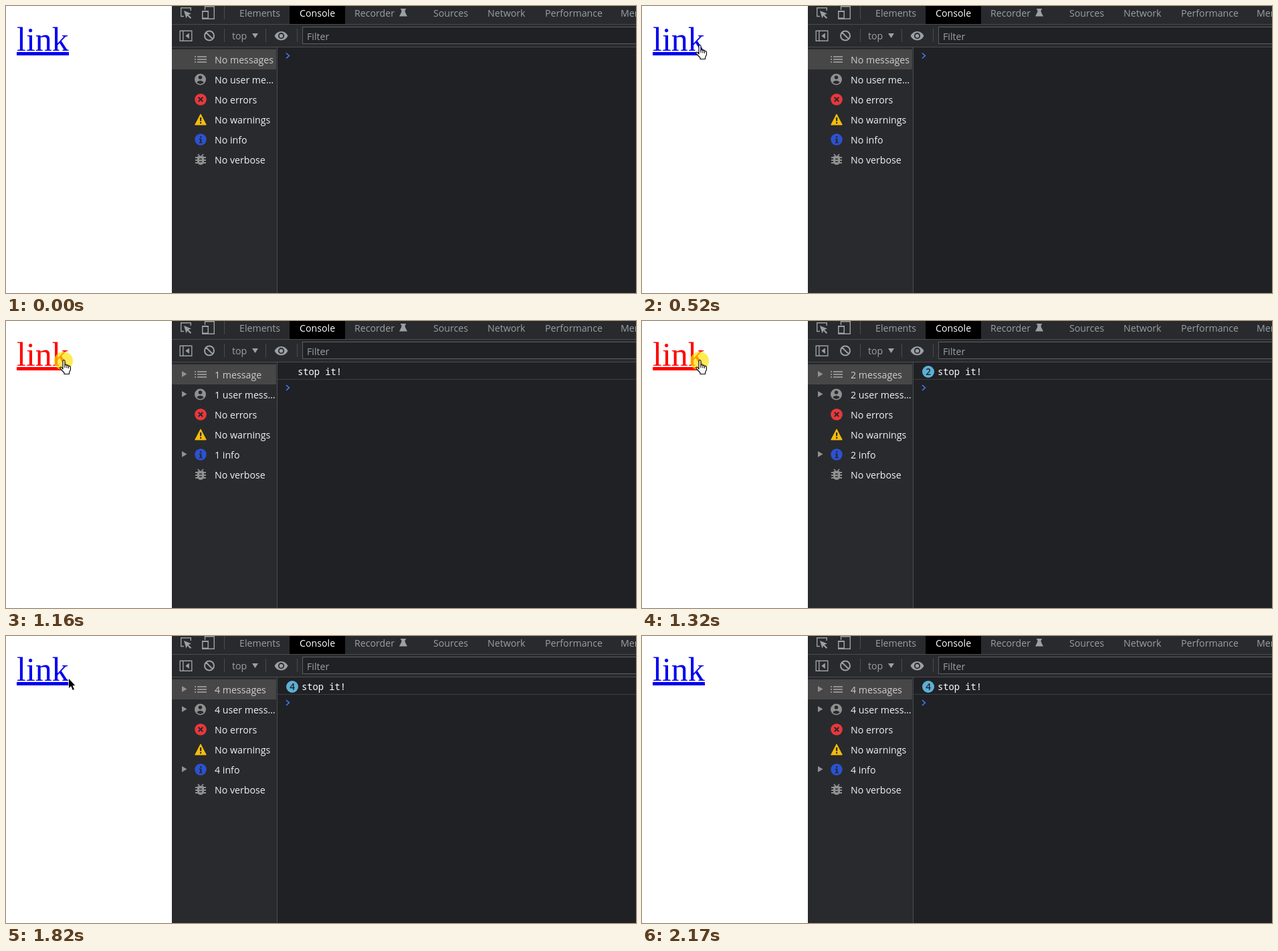
Animation, 942 px wide and 430 px high, one loop 2890 ms. Source, as an HTML page with a canvas:

```html
<!DOCTYPE html>
<html lang="en">
<head>
<meta charset="utf-8">
<title>Link clicks in the console</title>
<style>
html, body { margin: 0; width: 100%; height: 100%; overflow: hidden; background: #fff; }
canvas { display: block; }
</style>
</head>
<body>
<canvas id="stage" width="942" height="430"></canvas>
<script>
const ctx = document.getElementById('stage').getContext('2d');
const LOOP = 2890, TICK = 30;
const UI = '14.2px "Open Sans", "Noto Sans", sans-serif';
const MONO = '13.75px "Noto Sans Mono", monospace';
const PANEL = '#292a2d', DARK = '#202124', GRAY = '#9aa0a6', LINE = '#494c50', ICON = '#919191';

// Each click: pressed, released, highlight gone
const CLICKS = [[650, 750, 780], [1130, 1230, 1260], [1320, 1390, 1420], [1490, 1590, 1620]];

const ARROW = new Path2D('M0 0V14L3.2 11L5.8 17L8 16L5.5 10.3H9.3Z');
const HAND = new Path2D('M5 14V2Q5 .5 6.5 .5T8 2V8Q9.5 6.5 11 8.5Q12.5 7.5 13.5 9.5Q16 8.5 16.5 11.5V15L14.5 19V21.5H7V19.5L1.3 13.5Q0 10.8 2.5 11Z');
const KNUCKLES = new Path2D('M8 8V12M11 8.5V12.5M13.6 9.5V13');

function rect(x, y, w, h, color) {
  ctx.fillStyle = color;
  ctx.fillRect(x, y, w, h);
}

function text(str, x, y, color, font = UI, align = 'left') {
  ctx.font = font;
  ctx.textAlign = align;
  ctx.fillStyle = color;
  ctx.fillText(str, x, y);
}

function disc(x, y, r, color) {
  ctx.fillStyle = color;
  ctx.beginPath();
  ctx.arc(x, y, r, 0, Math.PI * 2);
  ctx.fill();
}

function fill(d, color) {
  ctx.fillStyle = color;
  ctx.fill(new Path2D(d), 'evenodd');
}

function stroke(d, color, width = 1) {
  ctx.strokeStyle = color;
  ctx.lineWidth = width;
  ctx.stroke(new Path2D(d));
}

function drawLink(pressed) {
  const color = pressed ? '#f00' : '#00e';
  text('link', 16, 67, color, '50px "Liberation Serif", "Times New Roman", serif');
  rect(16, 69, 78, 5, color);
}

function drawTabs() {
  rect(248, 0, 694, 62, PANEL);
  rect(424, 0, 83, 27, '#000');
  rect(248, 27, 694, 1, LINE);
  rect(248, 61, 694, 1, LINE);
  const tabs = [['Elements', 349], ['Console', 439], ['Recorder', 521], ['Sources', 639],
    ['Network', 720], ['Performance', 806], ['Memory', 919]];
  for (const [name, x] of tabs) text(name, x, 16, name === 'Console' ? '#fff' : GRAY);

  stroke('M266 15.5H261.7V2.7H276.3V7', GRAY, 1.4);
  fill('M266 7L277 11.5L272.8 13L277.2 17.5L275.5 19L271.2 14.6L269.5 18.5Z', GRAY);
  stroke('M297.5 6V.7H311.3V19.3H303', GRAY, 1.4);
  fill('M293 7H303V20H293ZM294.5 9V17.5H301.5V9Z', GRAY);
  rect(326, 0, 1, 20, LINE);
  fill('M590 4H598V5.5H596.7V9L600 15.5H588L591.3 9V5.5H590Z', GRAY);
}

function drawToolbar() {
  stroke('M260.2 37.2H277.8V52.3H260.2ZM264.8 37V52', GRAY, 1.4);
  fill('M273.8 40.5V49L268.3 44.7Z', GRAY);
  stroke('M311 44.5A7 7 0 1 1 297 44.5A7 7 0 1 1 311 44.5M299.2 39.7L308.8 49.3', GRAY, 2);
  for (const x of [326, 388, 435]) rect(x, 34, 1, 20, LINE);
  text('top', 338, 50, GRAY);
  fill('M368 41H377L372.5 48Z', GRAY);
  fill('M401.5 44.7Q405 38 411.5 38T421.5 44.7Q418 51.4 411.5 51.4T401.5 44.7Z', GRAY);
  disc(411.5, 44.7, 4.6, PANEL);
  disc(411.5, 44.7, 2.8, GRAY);
  rect(443, 31, 499, 26, '#5a5d61');
  rect(444, 32, 498, 24, DARK);
  text('Filter', 450, 51, GRAY);
}

function drawIcons() {
  for (const y of [75, 79, 83]) {
    rect(282, y, 2, 2, ICON);
    rect(286, y, 14, 2, ICON);
  }

  disc(290.5, 110, 8.5, ICON);
  disc(290.5, 107, 2.8, PANEL);
  fill('M285.3 114.2Q287 111.7 290.5 111.7T295.7 114.2Q293.8 117 290.5 117T285.3 114.2Z', PANEL);

  disc(291, 140, 8.8, '#e8383d');
  stroke('M287.7 136.7L294.3 143.3M294.3 136.7L287.7 143.3', PANEL, 2);

  fill('M291 162L299.3 178H282.7Z', '#f5bd0b');
  stroke('M282.7 178L291 162L299.3 178Z', '#f5bd0b', 1);
  rect(290, 167, 2.2, 5.5, PANEL);
  rect(290, 174, 2.2, 2.2, PANEL);

  disc(291, 200, 8.7, '#2b52d3');
  rect(290, 195, 2.4, 2.4, PANEL);
  fill('M288.8 198.8H292.4V204H293.6V205.5H288.6V204H290V200.2H288.8Z', PANEL);

  fill('M286 226Q287 224.5 291 224.5T296 226V234Q295 238 291 238T286 234Z', ICON);
  stroke('M283 227H299M283 231H299M283 235H299M287 222L289.5 225M295 222L292.5 225', ICON, 1.8);
  rect(289, 228.5, 4, 1.6, PANEL);
  rect(289, 232.5, 4, 1.6, PANEL);
}

function drawSidebar(count) {
  rect(248, 62, 157, 368, PANEL);
  rect(248, 65, 156, 30, '#474747');
  rect(405, 62, 1, 368, LINE);
  drawIcons();
  const n = count || 'No';
  const rows = [
    `${n} message${count === 1 ? '' : 's'}`,
    count ? `${n} user mess…` : 'No user me…',
    'No errors', 'No warnings', `${n} info`, 'No verbose'
  ];
  rows.forEach((label, i) => {
    const y = 80 + i * 30;
    text(label, 312, y + 6, i ? '#f1f2f3' : '#cdcdcd');
    if (count && [0, 1, 4].includes(i)) fill(`M263 ${y - 5}V${y + 4}L270.5 ${y - .5}Z`, ICON);
  });
}

function drawConsole(count) {
  rect(406, 62, 536, 368, DARK);
  if (count) {
    text('stop it!', count > 1 ? 442 : 436, 81, '#fff', MONO);
    rect(406, 87, 536, 1, '#3c3e42');
  }
  if (count > 1) {
    disc(428, 76, 9, '#5db0d7');
    text(count, 428, 81, DARK, '600 13.5px "Open Sans", sans-serif', 'center');
  }
  const y = count ? 100 : 74.5;
  stroke(`M419 ${y - 4}L423.3 ${y}L419 ${y + 4}`, '#4478f0', 1.7);
}

// Tip of the pointer, or null while it is off the stage
function pointer(t) {
  if (t < 30 || t >= 2150) return null;
  if (t < 520) {
    const s = Math.floor((t - 30) / TICK) * TICK;
    return { x: 86 + 703 * Math.exp(-s / 63.8), y: 58 + 330 * Math.exp(-s / 74.6) };
  }
  if (t < 1820) return { x: 86, y: 58 };
  const u = Math.floor((t - 1820) / TICK) / 10;
  return { x: 94 + 740 * u * u, y: 64 + 355 * u * u };
}

function drawPointer({ x, y }) {
  const over = x < 94;
  ctx.save();
  ctx.lineJoin = 'round';
  ctx.translate(Math.round(x) - (over ? 6 : 0), Math.round(y));
  ctx.strokeStyle = over ? '#000' : '#fff';
  ctx.fillStyle = over ? '#fff' : '#000';
  ctx.lineWidth = over ? 1.1 : 1.6;
  const shape = over ? HAND : ARROW;
  if (!over) ctx.stroke(shape);
  ctx.fill(shape);
  if (over) {
    ctx.stroke(shape);
    ctx.stroke(KNUCKLES);
  }
  ctx.restore();
}

function draw(t) {
  const count = CLICKS.filter(([, up]) => t >= up).length;
  const pressed = CLICKS.some(([down, up]) => t >= down && t < up);
  const glow = CLICKS.some(([down, , end]) => t >= down && t < end);
  rect(0, 0, 942, 430, '#fff');
  drawLink(pressed);
  drawTabs();
  drawToolbar();
  drawSidebar(count);
  drawConsole(count);
  if (glow) disc(86, 60, 14, 'rgba(255, 226, 0, .68)');
  const tip = pointer(t);
  if (tip) drawPointer(tip);
}

const start = performance.now();
function frame() {
  draw((performance.now() - start) % LOOP);
  requestAnimationFrame(frame);
}
frame();
</script>
</body>
</html>
```
